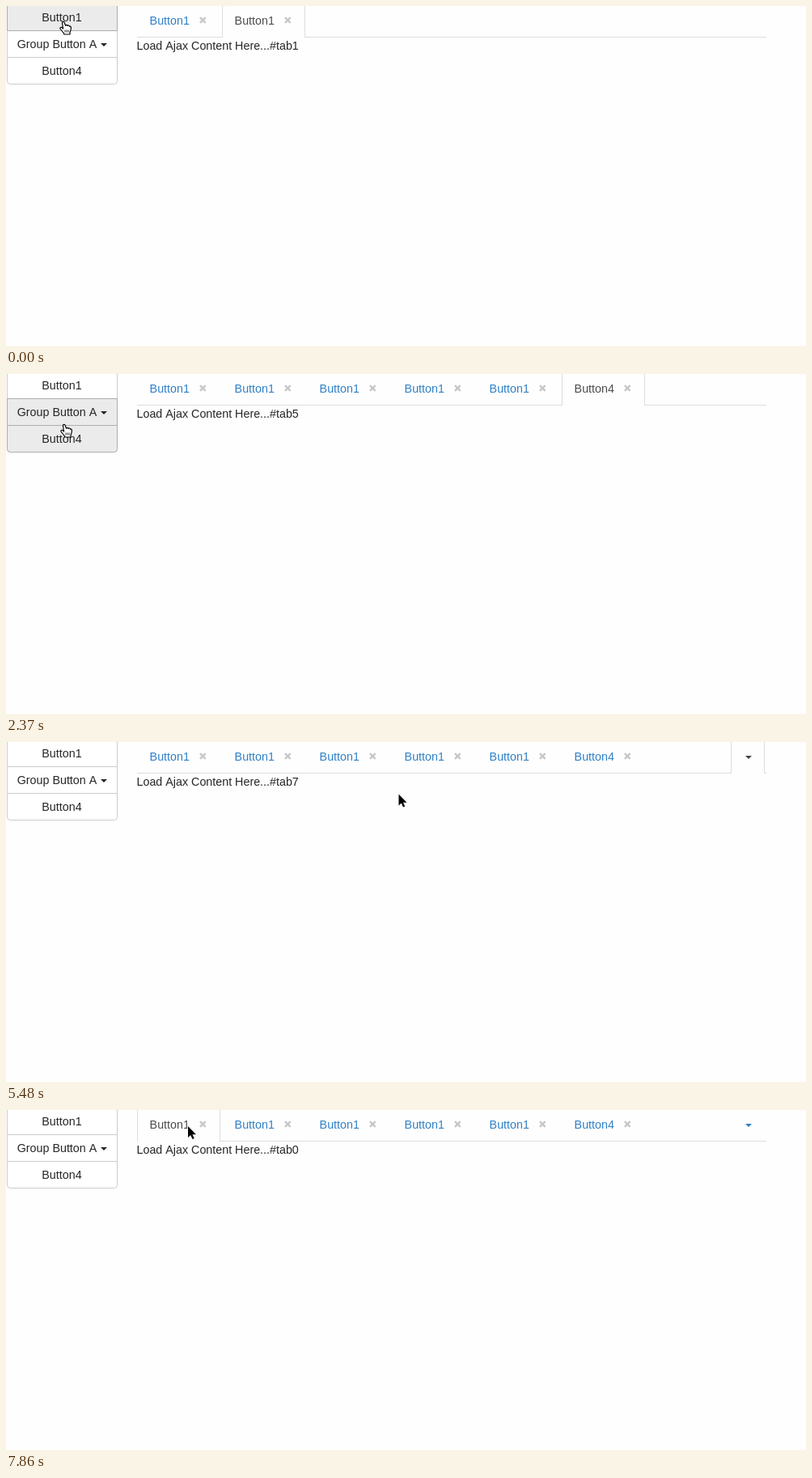
An HTML page with a canvas for the animation above (8 s loop, 989 by 420 pixels).

```html
<!DOCTYPE html>
<html lang="en">
<head>
<meta charset="utf-8">
<title>Tabs opened from buttons</title>
<style>
html, body { margin: 0; width: 100%; height: 100%; overflow: hidden; background: #fefefe; }
canvas { display: block; }
</style>
</head>
<body>
<canvas id="stage" width="989" height="420"></canvas>
<script>
const LOOP = 8000;
const TICK = LOOP / 54; // the screen refreshes in equal steps
const INK = '#262626', LINK = '#2f80c6', PAGE = '#fefefe';
const ctx = document.getElementById('stage').getContext('2d');

// All times below are counted in ticks.
const tabClicks = [2, 3, 5, 13, 22, 34];
const overflowStart = 22, listOpen = 41, tabReturn = 52;
const cursorMoves = [
  { from: 5, to: 12, x: 61, y: 92 },
  { from: 13, to: 15, x: 73, y: 62 },
  { from: 18, to: 20, x: 69, y: 90 },
  { from: 22, to: 23, x: 79, y: 39 },
  { from: 23, to: 25, x: 79, y: 48 },
  { from: 28, to: 32, x: 49, y: 111 },
  { from: 34, to: 40, x: 922, y: 18 },
  { from: 43, to: 44, x: 465, y: 132 },
  { from: 44, to: 45, x: 400, y: 173 },
  { from: 45, to: 50, x: 225, y: 20 }
];

const handShape = new Path2D('M-2.5 2.2C-2.8 .2-.4-.3 .2 1.5L1.6 5.2C2 4 4 4 4.2 5.4C4.8 4.6 6.3 4.9 6.5 6.2C7.3 5.6 8.4 6.3 8.4 7.4C8.6 10 7.6 12 7 13.5L7 16H-.2L-.4 14.8C-1.5 13.5-3.5 11-5 9C-5.6 7.8-4 6.8-2.8 7.6L-1.4 9Z');
const handLines = new Path2D('M1 10.5V13.5M3 10.5V13.5M5 10.5V13.5');
const arrowShape = new Path2D('M0 0V14L3.2 11L5.5 16L7.7 15L5.5 10.2H10Z');

const between = (n, from, to) => n >= from && n < to;

function cursorAt(n) {
  let x = 72, y = 19;
  for (const move of cursorMoves) {
    const p = Math.min(1, Math.max(0, (n - move.from) / (move.to - move.from)));
    x += (move.x - x) * p;
    y += (move.y - y) * p;
  }
  return { x, y };
}

function rect(x, y, w, h, color) {
  ctx.fillStyle = color;
  ctx.fillRect(x, y, w, h);
}

function text(label, x, baseline, color = INK) {
  ctx.font = '14.3px "Liberation Sans", sans-serif';
  ctx.fillStyle = color;
  ctx.fillText(label, x, baseline);
}

function caret(x, y, color) {
  ctx.fillStyle = color;
  ctx.beginPath();
  ctx.moveTo(x - 4, y);
  ctx.lineTo(x + 4, y);
  ctx.lineTo(x, y + 4);
  ctx.fill();
}

function closeIcon(x, y) {
  const r = 3.4;
  ctx.strokeStyle = 'rgba(0,0,0,.22)';
  ctx.lineWidth = 2.3;
  ctx.beginPath();
  ctx.moveTo(x - r, y - r);
  ctx.lineTo(x + r, y + r);
  ctx.moveTo(x + r, y - r);
  ctx.lineTo(x - r, y + r);
  ctx.stroke();
}

function box(x, y, w, h, radii, fill, border) {
  ctx.beginPath();
  ctx.roundRect(x + .5, y + .5, w - 1, h - 1, radii);
  ctx.fillStyle = fill;
  ctx.fill();
  ctx.shadowColor = 'transparent';
  ctx.strokeStyle = border;
  ctx.lineWidth = 1;
  ctx.stroke();
}

function menuBox(x, y, radii) {
  ctx.save();
  ctx.shadowColor = 'rgba(0,0,0,.19)';
  ctx.shadowBlur = 8;
  ctx.shadowOffsetY = 5;
  box(x, y, 160, 64, radii, '#fff', '#c0c0c0');
  ctx.restore();
}

function insetShadow(x, y, w, h) {
  ctx.save();
  ctx.beginPath();
  ctx.rect(x, y, w, h);
  ctx.clip();
  ctx.shadowColor = 'rgba(0,0,0,.16)';
  ctx.shadowBlur = 5;
  ctx.shadowOffsetY = 3;
  ctx.lineWidth = 6;
  ctx.strokeRect(x - 3, y - 3, w + 6, h + 6);
  ctx.restore();
}

function drawButtons(grey, pressed) {
  const rows = [0, 1, 2];
  const drawRow = (row, fill, border) =>
    box(1, row * 33 - 3, 137, 34, row === 2 ? [0, 0, 4, 4] : 0, fill, border);
  rows.forEach(row => drawRow(row, '#fff', '#ccc'));
  rows.filter(row => grey.includes(row)).forEach(row => drawRow(row, '#ebebeb', '#adadad'));
  if (pressed) insetShadow(2, 31, 135, 32);
  text('Button1', 44.3, 19);
  text('Group Button A', 13.7, 52);
  caret(121, 46, INK);
  text('Button4', 44.3, 85);
}

function activeFrame(x, w) {
  rect(x, 0, w, 39, '#ddd');
  rect(x + 1, 0, w - 2, 39, PAGE);
}

function drawTabs(count, active, hovered) {
  rect(162, 38, 778, 1, '#ddd');
  for (let i = 0; i < count; i++) {
    const x = 162 + i * 105;
    if (i === active) activeFrame(x, 103);
    else if (i === hovered) rect(x, 0, 103, 38, '#eee');
    text(i < 5 ? 'Button1' : 'Button4', x + 15.6, 23, i === active ? '#4c4c4c' : LINK);
    closeIcon(x + 81.3, 17.5);
  }
}

function drawOverflow(active) {
  if (active) activeFrame(896, 42);
  caret(918, 17, active ? '#444' : LINK);
}

function drawGroupMenu(cursorY) {
  menuBox(1, 66, 4);
  [72, 98].forEach((y, i) => {
    if (between(cursorY, y, y + 26)) rect(2, y, 158, 26, '#f5f5f5');
    text('Button' + (i + 2), 21.8, y + 18);
  });
}

function drawTabList() {
  menuBox(780, 38, [0, 0, 4, 4]);
  rect(781, 44, 158, 26, '#428bca');
  ['Button3', 'Button2'].forEach((label, i) => {
    text(label, 800.8, 62 + i * 26, i ? INK : '#fff');
    closeIcon(913.3, 56.5 + i * 26);
  });
}

function drawCursor({ x, y }, hand) {
  const path = hand ? handShape : arrowShape;
  ctx.save();
  ctx.translate(x, y);
  ctx.lineJoin = 'round';
  ctx.lineWidth = hand ? 1.2 : 1.6;
  ctx.strokeStyle = hand ? '#000' : '#fff';
  ctx.fillStyle = hand ? '#fff' : '#000';
  if (hand) ctx.fill(path);
  ctx.stroke(path);
  if (hand) {
    ctx.lineWidth = .8;
    ctx.stroke(handLines);
  } else ctx.fill(path);
  ctx.restore();
}

function draw(n) {
  const cursor = cursorAt(n);
  const opened = tabClicks.filter(click => click <= n);
  const newest = opened.length + 1;
  const count = Math.min(newest + 1, 6);
  const overflowActive = between(n, overflowStart, tabReturn);
  const returned = n >= tabReturn;
  const active = overflowActive ? -1 : returned ? 0 : newest;
  const loading = overflowActive && n - opened.at(-1) < 2 || n === tabReturn;
  const groupOpen = between(n, 18, 22) || between(n, 28, 34);

  // Button hover trails the cursor by half a tick.
  const trail = cursorAt(n - .5);
  const hoveredRow = trail.x < 138 ? Math.floor((trail.y + 3) / 33) : -1;
  const focusedRow = n < 13 ? 0 : n < 18 ? 2 : -1;
  const onTab = n > listOpen && !returned && cursor.x < 265 && cursor.y < 60;
  const onButtons = cursor.x < 138 && cursor.y < 97;
  const onOverflow = cursor.x > 896 && cursor.y < 38;

  rect(0, 0, 989, 420, PAGE);
  drawButtons(groupOpen ? [1] : [focusedRow, hoveredRow], groupOpen);
  drawTabs(count, active, onTab ? 0 : -1);
  if (n >= overflowStart) drawOverflow(overflowActive);
  if (!loading) text('Load Ajax Content Here...#tab' + (returned ? 0 : newest), 161.5, 54);
  if (groupOpen) drawGroupMenu(cursor.y);
  if (between(n, listOpen, tabReturn)) drawTabList();
  drawCursor(cursor, onButtons || groupOpen || onOverflow || onTab);
}

const start = performance.now();
function tick() {
  const t = (performance.now() - start) % LOOP;
  draw(Math.floor((t + 3) / TICK) % 54);
  requestAnimationFrame(tick);
}
tick();
</script>
</body>
</html>
```
